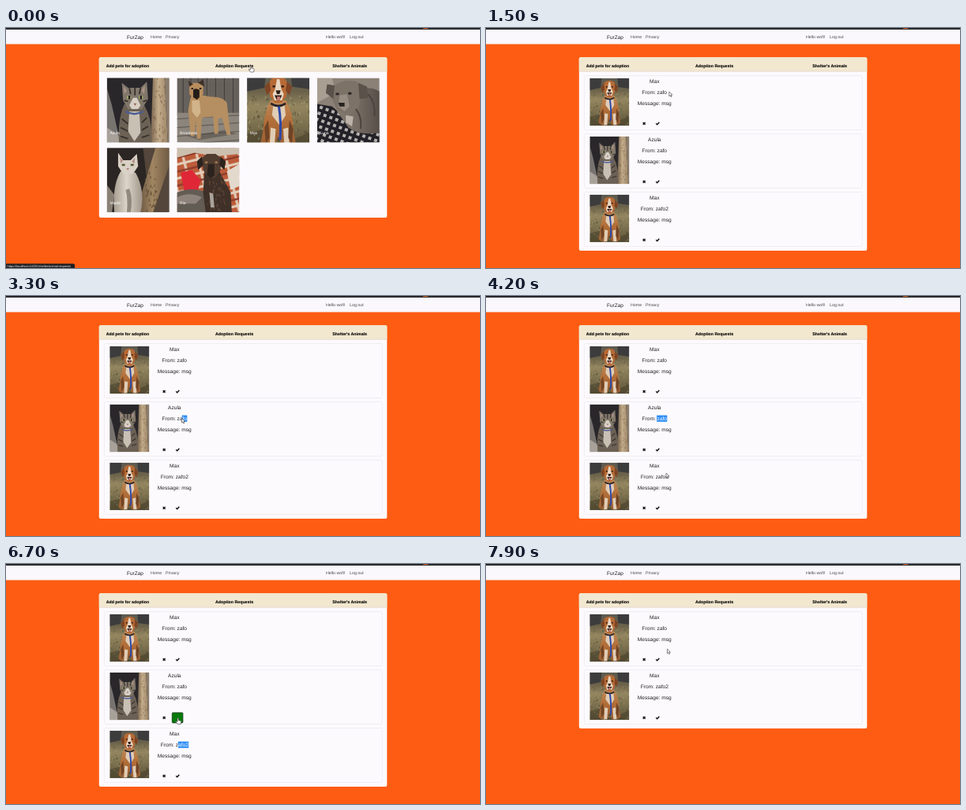
An HTML page that plays this animation: 600 by 305 pixels, repeating every 8000 ms.

```html
<!DOCTYPE html>
<html lang="en">
<head>
<meta charset="utf-8">
<title>Pet adoption requests</title>
<style>
  html, body { margin: 0; width: 100%; height: 100%; overflow: hidden; background: #fd5c12; }
  #stage { display: block; width: 600px; height: 305px; }
  text { font-family: "Liberation Sans", Arial, sans-serif; fill: #222; text-rendering: geometricPrecision; }
  .brand { font-size: 6.5px; }
  .nav { font-size: 5.3px; fill: #484848; }
  .tab { font-size: 5.25px; font-weight: bold; fill: #000; stroke: #000; stroke-width: .1px; }
  .line { font-size: 6.6px; text-anchor: middle; }
  .caption { font-size: 5px; fill: #fff; }
  .status { font-size: 3.9px; fill: #eee; }
  .photo { filter: blur(.45px); }
</style>
</head>
<body>
<svg id="stage" viewBox="0 0 600 305">
  <defs>
    <linearGradient id="grass" x2="0" y2="1">
      <stop offset="0" stop-color="#5d5a50"/><stop offset=".25" stop-color="#6b624a"/>
      <stop offset=".45" stop-color="#93865f"/><stop offset="1" stop-color="#5d5439"/>
    </linearGradient>
    <linearGradient id="post">
      <stop offset="0" stop-color="#77624c"/><stop offset=".45" stop-color="#c4ad8b"/><stop offset="1" stop-color="#9c8466"/>
    </linearGradient>
    <linearGradient id="bark">
      <stop offset="0" stop-color="#5a4736"/><stop offset=".5" stop-color="#a18662"/><stop offset="1" stop-color="#6f5a43"/>
    </linearGradient>
    <linearGradient id="coat" x2="0" y2="1">
      <stop offset="0" stop-color="#c08a57"/><stop offset=".5" stop-color="#b06c37"/><stop offset="1" stop-color="#9a6034"/>
    </linearGradient>
    <linearGradient id="cream">
      <stop offset="0" stop-color="#a79d90"/><stop offset=".45" stop-color="#ddd5c9"/><stop offset="1" stop-color="#a0968a"/>
    </linearGradient>
    <linearGradient id="slate">
      <stop offset="0" stop-color="#857a70"/><stop offset=".5" stop-color="#756b62"/><stop offset="1" stop-color="#564e48"/>
    </linearGradient>
    <pattern id="check" width="5" height="5" patternUnits="userSpaceOnUse" patternTransform="rotate(20)">
      <path fill="#222127" d="M0 0h5v5h-5z"/><path fill="#b5b1ae" d="M0 0h2.5v2.5h-2.5z"/>
    </pattern>
    <pattern id="plaid" width="11" height="11" patternUnits="userSpaceOnUse" patternTransform="rotate(-14)">
      <path fill="#bd5c3a" d="M0 0h11v11h-11z"/><path fill="#e2cdb8" d="M0 1h11v2h-11zM2 0h2v11h-2z"/>
      <path fill="#8c3a2a" d="M0 7h11v1.5h-11z"/>
    </pattern>
    <clipPath id="marked"><rect id="clip"/></clipPath>

    <g id="max">
      <path fill="url(#grass)" d="M0 0h50v60H0z"/>
      <path fill="#3c3c3d" d="M0 0h15l-1 12-14 3zM35 0h15v13l-14-2z"/>
      <path fill="#47402c" opacity=".55" d="M0 49l14-4 24 8 12-5v12H0z"/>
      <g data-strokes="5 90 0 18 50 41 #544b33"/>
      <g data-strokes="8 70 0 18 50 41 #ac9e79"/>
      <path fill="url(#coat)" d="M19 22q-5 8-6 24l-2 10 4 3h7l3-8 3 8h7l4-3-2-10q0-15-6-24z"/>
      <path fill="#e0cdb5" d="M21 26q5 3 9 0l1 8-5 8-6-8zM19 44l4 1-1 14h-4zM29 45l4-1 1 15h-4z"/>
      <path fill="#6e4426" d="M14 44l3-6 1 14-3 5zM37 45l-3-7-1 14 3 5z"/>
      <path fill="#b66a35" d="M17.5 9q1-6 7.5-6t7.5 6l-1 10-4 5h-5l-4-5z"/>
      <path fill="#7f4524" d="M18 7l-4 4 2 7 3-4zM32 7l4 4-2 7-3-4z"/>
      <path fill="#e8d6c1" d="M24 5h2l1.5 8 2 4-1.5 5h-6l-1.5-5 2-4z"/>
      <path fill="#2c1d18" d="M23 14h4l-1 3h-2zM20.5 10h2v1.6h-2zM27.5 10h2v1.6h-2zM22 18h6l-2 4h-2z"/>
      <path fill="#c77a73" d="M24 19h2.5v3H24z"/>
      <path fill="none" stroke="#25242c" stroke-width="1.6" d="M19 24.5q6 4 12 0"/>
      <path fill="none" stroke="#2c47a8" stroke-width="1.9" d="M25.5 27q2 12 1 27"/>
    </g>

    <g id="azula">
      <path fill="#29272a" d="M0 0h50v60H0z"/>
      <path fill="#77736f" d="M0 12l4 14 4 18 4 16H0z"/>
      <path fill="#a8a19a" d="M0 44l9 6 3 10H0z"/>
      <path fill="url(#post)" d="M37 0h9l3 60H35z"/>
      <path fill="#8b7d6c" d="M46 0h4v60h-1z"/>
      <g data-strokes="3 40 37 0 10 56 #80694f"/>
      <path fill="#6c6155" d="M14 25q-6 13-4 35h25q3-20-5-34z"/>
      <path fill="#c9c0b4" d="M18 31h8l1 17-5 7-5-8z"/>
      <path fill="#81776b" d="M12 8l5 4h10l5-5 1 14-5 8H17l-4-7z"/>
      <path fill="#ad9286" d="M13.5 11l2.5 3-2 3zM30.5 10l-3 4 2.5 3z"/>
      <path fill="none" stroke="#342e29" stroke-width="1.1" d="M18 12l1 5M22.5 12v6M27 12l-1 5M14 22l3 1M32 22l-3 1M12 37l5 4M11 44l6 3M11 51l6 2M32 36l-4 4M33 43l-5 3M34 50l-6 2"/>
      <path fill="#d8d0c5" d="M21 20h3l3 6-2 3h-5l-2-3z"/>
      <path fill="#9da06a" d="M16 18.5h3.5v2.4H16zM25.5 18.5H29v2.4h-3.5z"/>
      <path fill="#1d1b19" d="M17.3 18.3h1.4v2.8h-1.4zM26.6 18.3H28v2.8h-1.4z"/>
      <path fill="#96645c" d="M21.3 24.5h2.6l-1.3 1.8z"/>
      <path fill="none" stroke="#4a5c96" stroke-width="1.5" d="M15 31q7 4 14 0"/>
    </g>

    <g id="broadway">
      <path fill="#67615c" d="M0 0h50v30H0z"/>
      <path fill="#8c857c" d="M0 28h50v24H0z"/>
      <path stroke="#45413e" stroke-width=".7" d="M5 0v28M11 0v28M17 0v28M24 0v28M31 0v28M38 0v28M45 0v28"/>
      <path stroke="#635d57" stroke-width=".8" d="M0 33l50-3M0 40l50-4M0 47l50-4M0 54l50-4"/>
      <path fill="#4a443f" opacity=".5" d="M8 47l30-5 10 3-30 5z"/>
      <path fill="#b58f61" d="M11 15q8-2 15 0 11 0 14 5l1 9 2 17h-3l-4-14-3 1v12h-3l-1-14-9 1-1 17h-3l-1-16-1 14h-3L9 26z"/>
      <path fill="#d2b48a" d="M12 18h6l1 10-3 4-4-5z"/>
      <path fill="#b98e5d" d="M10 6l3-2h4l4 2v7l-3 5h-4l-4-5z"/>
      <path fill="#3e3029" d="M10 7l-1-5 4 3zM17 4l4-3 1 6z"/>
      <path fill="#231d1a" d="M13 9.5l2-1 3 1v6l-2 2-3-2zM11.5 8H13v1.2h-1.5zM18 8h1.5v1.2H18z"/>
    </g>

    <g id="luna">
      <path fill="#8b8176" d="M0 0h50v52H0z"/>
      <path fill="#a89e91" d="M0 0h12l3 12-15 8z"/>
      <path fill="url(#check)" d="M0 21l12 2 14 12 24 3v14H0z"/>
      <path fill="url(#slate)" d="M22 14q18-10 28-3v33q-16 3-25-4l-9-13z"/>
      <path fill="#7c7268" d="M13 7q8-7 19-4l5 7-4 14-8 6-9-4-4-9z"/>
      <path fill="#5a514a" d="M14 6L8 5l-1 7 6 5zM33 4l7 3 1 9-7 1z"/>
      <path fill="#978c81" d="M18 14l6-1 2 10-4 4-5-4z"/>
      <path fill="#25211f" d="M17 20h5v3h-4zM15 12h2.5v1.8H15zM25 11.5h2.5v1.8H25z"/>
      <path fill="#bdb3a8" d="M23 30l6 1-1 8-5-3z"/>
      <path fill="none" stroke="#4a423d" stroke-width="1.2" d="M31 25q5 6 4 16M41 13q6 7 5 18"/>
    </g>

    <g id="maple">
      <path fill="#2b2623" d="M0 0h50v52H0z"/>
      <path fill="#54463b" d="M29 0h21v52H35z"/>
      <path fill="#8a8075" d="M0 30l6 8-2 14H0z"/>
      <path fill="url(#bark)" d="M39 0h11v14L37 52H23z"/>
      <g data-strokes="6 35 31 10 9 40 #57452f"/>
      <path fill="url(#cream)" d="M11 19q-7 12-5 33h21q4-17-4-32z"/>
      <path fill="#756c63" opacity=".7" d="M18 33q3 8 1 19h-3q1-11-1-18z"/>
      <path fill="#d9d1c6" d="M9 4l4 6h6l5-5 1 10-4 6h-8l-4-6z"/>
      <path fill="#b08f83" d="M10.5 7.5l2.5 3-2 2zM22.5 8L20 11l2 2z"/>
      <path fill="#55582f" d="M12 13h2.5v1.6H12zM19 13h2.5v1.6H19z"/>
      <path fill="#a87b72" d="M15.5 16.5H18l-1.2 1.6z"/>
    </g>

    <g id="ria">
      <path fill="url(#plaid)" d="M0 0h50v52H0z"/>
      <path fill="#cbbfae" d="M0 0h50v5L30 7 14 4 0 8z"/>
      <path fill="#e3d9cd" d="M40 19l10-6v18l-7 3z"/>
      <path fill="#df2738" d="M3 20l9-2 7 8-2 8-11 2z"/>
      <path fill="#635c55" d="M0 36q12-5 24 0l2 16H0z"/>
      <path fill="#8d837a" d="M0 40q10-5 20 0l-5 5H0z"/>
      <path fill="#3f3028" d="M22 19h12l9 17 1 16H23l-2-16z"/>
      <g data-strokes="9 45 24 22 15 28 #6d513c"/>
      <path fill="#513d30" d="M20 8l4-3h7l4 3v10l-4 6h-6l-4-6z"/>
      <path fill="#2c231f" d="M20 7l-4 4 1 7 4-4zM35 7l4 4-1 7-4-4zM25 13h5v9l-2 2h-2l-2-2z"/>
      <path fill="#a87c50" d="M22.5 11h2v1.5h-2zM30.5 11h2v1.5h-2z"/>
      <path fill="#a8a29a" d="M26 36l3 1 1 11h-3z"/>
    </g>
  </defs>

  <path fill="#fd5c12" d="M0 0h600v305H0z"/>
  <path fill="#fbf8fd" d="M0 2h600v18.5H0z"/>
  <path fill="#29282b" d="M0 0h600v2H0z"/>
  <path fill="#e0722c" d="M528 0h6v.9h-6z"/>
  <text class="brand" x="153" y="13.7">FurZap</text>
  <text class="nav" x="183" y="13.3">Home</text>
  <text class="nav" x="202" y="13.3">Privacy</text>
  <text class="nav" x="405" y="13.3">Hello wofi!</text>
  <text class="nav" x="435" y="13.3">Log out</text>

  <rect id="card" x="117.8" y="37.3" width="364.5" rx="2" fill="#fcfafd"/>
  <path fill="#f2e7cf" d="M117.8 55V39.3q0-2 2-2h360.5q2 0 2 2V55z"/>
  <path fill="#e0d6c2" d="M117.8 54.8h364.5v.6H117.8z"/>
  <text class="tab" x="126.7" y="50.1">Add pets for adoption</text>
  <text class="tab" x="265" y="50.1">Adoption Requests</text>
  <text class="tab" x="413.3" y="50.1">Shelter's Animals</text>

  <g id="views"></g>
  <g id="selection">
    <rect id="mark" fill="#2b8cf5"/>
    <text id="picked" class="line" x="213.3" clip-path="url(#marked)" style="fill:#fff"></text>
  </g>
  <rect id="hover" x="210.3" width="13.6" height="13" rx="1" y="188.9" fill="#077a0b" stroke="#18351a" stroke-width=".8"/>
  <g id="status">
    <path fill="#1f1e21" d="M0 299.5h85q2 0 2 2V305H0z"/>
    <text class="status" x="1.5" y="303.8">https://localhost:44335/shelter/animal-requests</text>
  </g>
  <g id="cursor" stroke="#333" stroke-width=".6" stroke-linejoin="round">
    <path id="arrow" fill="#fff" d="M0 0v5.6l1.3-1.2 1 2.2 1-.5-1-2.1h1.8z"/>
    <path id="hand" fill="#fff" d="M-.7.6q.7-1 1.4 0v2.6l2.8.7q.7.3.6 1.1L3.5 8H-.4L-2.8 5q.2-1 1.1-.4l1 .7z"/>
  </g>
</svg>
<script>
const LOOP = 8000, STEP = 100;
const OPENED = 300, STATUS_OFF = 1300, ACCEPTED = 7000;
const $ = id => document.getElementById(id);

function random(seed) {
  return () => (seed = seed * 16807 % 2147483647) / 2147483647;
}

// Short seeded strokes for grass, bark and fur
for (const g of document.querySelectorAll("[data-strokes]")) {
  const [seed, count, x, y, w, h, color] = g.dataset.strokes.split(" ");
  const rnd = random(seed * 7919);
  let d = "";
  for (let i = 0; i < count; i++) {
    d += `M${+x + rnd() * w} ${+y + rnd() * h}l${rnd() * 2 - 1} ${1 + rnd() * 1.5}`;
  }
  g.innerHTML = `<path d="${d}" stroke="${color}" stroke-width=".8" opacity=".7"/>`;
}

const photo = (id, x, y, w, h, box) =>
  `<svg x="${x}" y="${y}" width="${w}" height="${h}" viewBox="${box}" preserveAspectRatio="none"><use class="photo" href="#${id}"/></svg>`;

function tile(name, i) {
  const id = name.toLowerCase();
  const x = 127.7 + (i % 4) * 88.7, y = 63.5 + Math.floor(i / 4) * 88.7;
  const box = id === "max" || id === "azula" ? "0 4 50 52" : "0 0 50 52";
  return photo(id, x, y, 79, 82, box) +
    `<text class="caption" x="${x + 3.7}" y="${y + 71.3}">${name}</text>`;
}

function row([pet, sender], i) {
  const y = 60.5 + i * 74;
  const line = (s, dy) => `<text class="line" x="213.3" y="${y + dy}">${s}</text>`;
  return `<rect x="124.5" y="${y}" width="351.5" height="69" rx="1" fill="none" stroke="#efedf1" stroke-width=".9"/>` +
    photo(pet.toLowerCase(), 131.3, y + 3.3, 50, 60.5, "0 0 50 60") +
    line(pet, 9.8) + line("From: " + sender, 23.5) + line("Message: msg", 37.3) +
    `<g fill="none" stroke="#111" stroke-width="1.4">
       <path d="M198.7 ${y + 59.4}l2.9 2.9m0-2.9l-2.9 2.9"/>
       <path d="M215.2 ${y + 60.7}l1.5 1.5 2.6-3"/></g>`;
}

const first = ["Max", "zafo"], second = ["Azula", "zafo"], third = ["Max", "zafo2"];
const views = [
  { bottom: 241, html: ["Azula", "Broadway", "Max", "Luna", "Maple", "Ria"].map(tile) },
  { bottom: 283, html: [first, second, third].map(row) },
  { bottom: 209, html: [first, third].map(row) }
];
$("views").innerHTML = views.map(v => `<g>${v.html.join("")}</g>`).join("");

// Pointer tip: time, x, y
const path = [
  [0, 310, 48], [600, 307, 47.6], [1000, 305, 48], [1500, 231.8, 81],
  [1900, 229, 81], [2200, 215, 82], [2400, 222.3, 87], [2900, 230, 153],
  [3100, 229, 155], [3500, 216, 156], [4200, 228, 225], [4500, 231, 228],
  [4900, 218, 229], [5400, 219, 226], [6200, 218, 208], [6500, 217.6, 195.5],
  [7100, 217.8, 195.3], [7500, 229, 150], [7900, 229.4, 108]
];

// Text marked by dragging leftwards
const drags = [
  { start: 1900, end: 2200, until: 3000, row: 0, left: 214.8, right: 229.3, text: "From: zafo" },
  { start: 3100, end: 3500, until: 4500, row: 1, left: 216.2, right: 229.3, text: "From: zafo" },
  { start: 4500, end: 4900, until: ACCEPTED, row: 2, left: 217.9, right: 231.2, text: "From: zafo2" }
];

const ease = k => k * k * (3 - 2 * k);

function pointer(t) {
  const i = path.findIndex(p => p[0] > t);
  if (i < 0) return path[path.length - 1].slice(1);
  const [t0, x0, y0] = path[i - 1], [t1, x1, y1] = path[i];
  const k = ease((t - t0) / (t1 - t0));
  return [x0 + (x1 - x0) * k, y0 + (y1 - y0) * k];
}

const show = (el, on) => { el.style.display = on ? "" : "none"; };

function drawSelection(t) {
  const d = drags.find(d => t >= d.start && t < d.until);
  show($("selection"), d);
  if (!d) return;
  const k = ease(Math.min(1, (t - d.start) / (d.end - d.start)));
  const x = d.right + (d.left - d.right) * k, y = 77.6 + d.row * 74;
  for (const r of [$("mark"), $("clip")]) {
    r.setAttribute("x", x);
    r.setAttribute("y", y);
    r.setAttribute("width", d.right - x);
    r.setAttribute("height", 8.2);
  }
  $("picked").setAttribute("y", 84 + d.row * 74);
  $("picked").textContent = d.text;
}

function draw(t) {
  const page = t < OPENED ? 0 : t < ACCEPTED ? 1 : 2;
  [...$("views").children].forEach((g, i) => show(g, i === page));
  $("card").setAttribute("height", views[page].bottom - 37.3);
  show($("status"), t < STATUS_OFF);
  drawSelection(t);

  const [x, y] = pointer(t);
  const onTab = x > 265 && x < 314 && y > 45 && y < 53;
  const onCheck = page > 0 && x > 210 && x < 224 && y > 189 && y < 202;
  show($("hover"), onCheck);
  show($("hand"), onTab || onCheck);
  show($("arrow"), !onTab && !onCheck);
  $("cursor").setAttribute("transform", `translate(${x} ${y})`);
}

const began = performance.now();
function tick() {
  const t = (performance.now() - began) % LOOP;
  draw(Math.floor(t / STEP) * STEP);
  requestAnimationFrame(tick);
}
draw(0);
requestAnimationFrame(tick);
</script>
</body>
</html>
```
